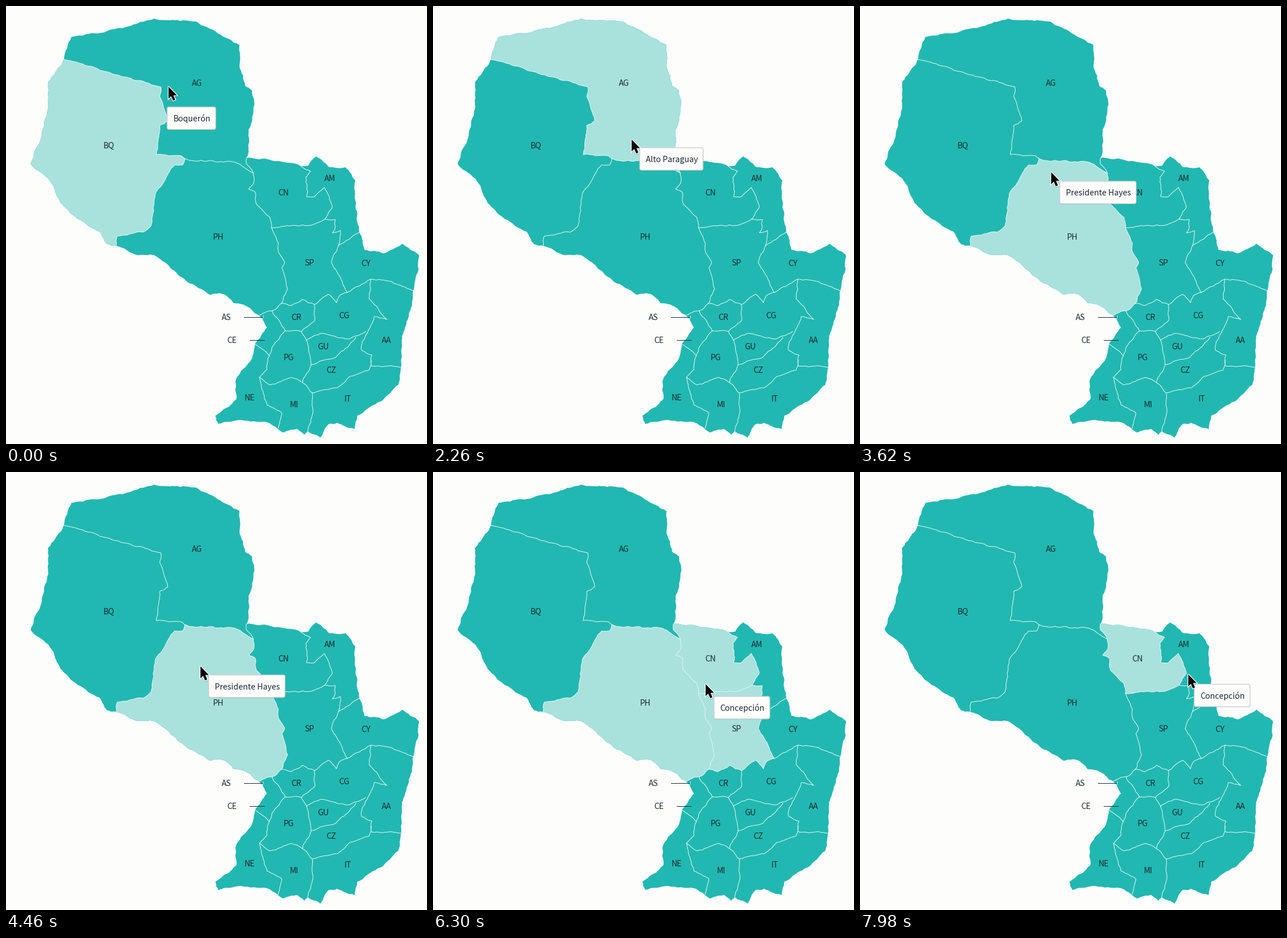
Write a matplotlib script that moves like this. It is 734 by 763 pixels and loops after 8000 ms.

```python
import math
import random

import matplotlib.pyplot as plt
import numpy as np
from matplotlib.animation import FuncAnimation
from matplotlib.patches import FancyBboxPatch, Polygon

W, H, DPI = 734, 763, 64
STEP, FRAMES = 40, 200
LAG = 40
PT = 72 / DPI
TEAL, LIGHT, PAPER, INK = "#21b8b1", "#a9e1dd", "#fdfdfc", "#1c2a31"
FONT = dict(family="Noto Sans CJK JP", size=14 * PT, color=INK, va="baseline")

rng = random.Random(4)
arcs = {}


def meander(a, b):
    """Points after a up to b, split again and again with small sideways shifts."""
    dx, dy = b[0] - a[0], b[1] - a[1]
    size = math.hypot(dx, dy)
    if size < 6:
        return [b]
    k = rng.uniform(-1, 1) * min(0.09, 1.6 / size)
    mid = ((a[0] + b[0]) / 2 - k * dy, (a[1] + b[1]) / 2 + k * dx)
    return meander(a, mid) + meander(mid, b)


def arc(name, *points):
    arcs[name] = [points[0]]
    for a, b in zip(points, points[1:]):
        arcs[name] += meander(a, b)


def ring(names):
    """Join arcs into a closed outline; a leading minus reverses an arc."""
    out = []
    for name in names.split():
        out += arcs[name[1:]][::-1] if name[0] == "-" else arcs[name]
    return out


# outer edge, clockwise
arc("ag", (101, 93), (114, 54), (194, 39), (258, 22), (331, 27), (407, 68), (407, 104),
    (417, 139), (429, 147), (433, 172), (423, 215), (424, 236), (419, 265))
arc("cn", (419, 265), (456, 267), (490, 273), (513, 278))
arc("am", (513, 278), (527, 278), (541, 262), (562, 280), (592, 281), (609, 304),
    (608, 322), (616, 394))
arc("cy", (616, 394), (625, 425), (658, 431), (691, 414), (720, 434), (719, 460),
    (710, 496))
arc("aa", (710, 496), (705, 530), (690, 582), (689, 629))
arc("it", (689, 629), (684, 660), (655, 688), (613, 713), (608, 737), (577, 726),
    (563, 728), (548, 752), (526, 741))
arc("mi", (526, 741), (520, 747), (508, 737), (483, 743), (474, 737))
arc("ne", (474, 737), (455, 725), (410, 721), (370, 728), (365, 714), (402, 684),
    (400, 655), (430, 610), (434, 589))
arc("ce", (434, 589), (455, 560), (441, 539))
arc("ph", (441, 539), (420, 523), (396, 517), (380, 502), (355, 503), (315, 480),
    (258, 434), (230, 434), (192, 418))
arc("bq", (192, 418), (176, 415), (163, 393), (125, 371), (95, 343), (73, 300),
    (43, 275), (66, 210), (74, 160), (73, 133), (101, 93))
coast = list(arcs)

# borders of the regions that light up
arc("ag_bq", (101, 93), (185, 118), (270, 141), (268, 158), (282, 200), (268, 208),
    (262, 259), (306, 261), (312, 266))
arc("bq_ph", (312, 266), (308, 277), (294, 277), (275, 307), (260, 329), (253, 383),
    (239, 394), (194, 401), (192, 418))
arc("ag_ph", (312, 266), (320, 269), (399, 272), (431, 291))
arc("ag_cn", (419, 265), (419, 275), (431, 291))
arc("ph_cn", (431, 291), (432, 308), (423, 319), (435, 325), (437, 346), (460, 368),
    (463, 386))
arc("ph_sp", (463, 386), (475, 413), (474, 424), (486, 447), (481, 456), (491, 493),
    (480, 518))
arc("ph_ce", (480, 518), (464, 531), (455, 532), (441, 539))
arc("cn_am", (513, 278), (531, 288), (523, 298), (524, 332), (538, 332), (555, 316),
    (569, 350), (556, 371))
arc("cn_sp", (463, 386), (535, 381), (556, 371))
arc("sp_am", (556, 371), (574, 372), (574, 386), (569, 395), (583, 391), (580, 417))
arc("sp_cy", (580, 417), (567, 447), (577, 463), (595, 499))
arc("sp_cg", (595, 499), (581, 505), (576, 517), (562, 502), (538, 520))
arc("sp_cr", (538, 520), (517, 511), (497, 522), (480, 518))

# remaining borders, each drawn through several junctions
arc("am_cy", (580, 417), (616, 394))
arc("cy_south", (595, 499), (636, 476), (672, 480), (710, 496))
arc("aa_west", (636, 476), (633, 510), (664, 546), (642, 541), (621, 585), (620, 600),
    (638, 608), (637, 627), (689, 629))
arc("cr_cg", (538, 520), (538, 548), (515, 567))
arc("cr_south", (464, 531), (487, 566), (515, 567), (524, 582))
arc("pg_west", (487, 566), (464, 594), (459, 609), (455, 633), (442, 647))
arc("ne_ce", (434, 589), (459, 609))
arc("pg_east", (524, 582), (532, 625), (517, 656))
arc("gu_cg", (524, 582), (550, 570), (598, 580), (627, 567))
arc("gu_cz", (532, 625), (575, 612), (610, 577))
arc("south", (442, 647), (460, 660), (498, 647), (517, 656), (534, 674), (578, 665),
    (600, 645), (633, 634), (637, 617))
arc("mi_it", (534, 674), (535, 709), (526, 741))
arc("mi_ne", (442, 647), (455, 695), (481, 709), (474, 737))
arc("as", (449, 540), (447, 547))

LABELS = dict(AG=(333, 134), BQ=(179, 243), PH=(370, 402), CN=(483, 325),
              AM=(564, 300), SP=(528, 447), CY=(627, 448), CR=(506, 542),
              CG=(589, 539), AA=(663, 582), GU=(553, 593), PG=(492, 612),
              CZ=(566, 634), NE=(424, 682), MI=(502, 694), IT=(595, 684),
              AS=(384, 542), CE=(393, 582))

# region: name, outline, time the pointer enters and leaves
REGIONS = [
    ("Boquerón", "bq ag_bq bq_ph", -999, 40),
    ("Alto Paraguay", "ag ag_cn -ag_ph -ag_bq", 40, 2920),
    ("Presidente Hayes", "ag_ph ph_cn ph_sp ph_ce ph -bq_ph", 2920, 6200),
    ("San Pedro", "cn_sp sp_am sp_cy sp_cg sp_cr -ph_sp", 6200, 6240),
    ("Concepción", "cn cn_am -cn_sp -ph_cn -ag_cn", 6240, 9999),
]

# time, x, y of the pointer tip
POINTER = [(-40, 266, 158), (0, 283, 140), (240, 320, 146), (1240, 332, 156),
           (2240, 346, 232), (3600, 333, 289), (4920, 342, 366), (5320, 382, 382),
           (6160, 458, 396), (6240, 475, 373), (6280, 475, 369), (7560, 530, 349),
           (7960, 572, 352)]


def pointer(t):
    times, xs, ys = zip(*POINTER)
    return np.interp(t, times, xs), np.interp(t, times, ys)


def glow(enter, leave, t):
    """Full while hovered, then a short hold and fade."""
    if t < enter:
        return 0.0
    return min(1.0, max(0.0, 1 - (t - leave - 120) / 120))


fig = plt.figure(figsize=(W / DPI, H / DPI), dpi=DPI, facecolor=PAPER)
ax = fig.add_axes([0, 0, 1, 1])
ax.set(xlim=(0, W), ylim=(H, 0))
ax.axis("off")

ax.add_patch(Polygon(ring(" ".join(coast)), fc=TEAL, ec="none"))
lit = [ax.add_patch(Polygon(ring(names), fc=LIGHT, ec="none", zorder=2))
       for _, names, _, _ in REGIONS]
for name, points in arcs.items():
    if name not in coast:
        ax.plot(*zip(*points), color="#e6f7f5", lw=PT, zorder=3,
                solid_joinstyle="round")
for x0, x1, y in ((415, 447, 542), (425, 450, 582)):
    ax.plot((x0, x1), (y, y), color=INK, lw=PT, zorder=4)
for code, (x, y) in LABELS.items():
    ax.text(x + 0.5, y + 5, code, ha="center", zorder=4, **FONT)

ROUND = dict(boxstyle="round,pad=0,rounding_size=3")
shade = ax.add_patch(FancyBboxPatch((0, 0), 1, 1, fc="#00000014", ec="none", zorder=5,
                                    **ROUND))
box = ax.add_patch(FancyBboxPatch((0, 0), 1, 1, fc=PAPER, ec="#d3d2cb", lw=1.4 * PT,
                                  zorder=6, **ROUND))
tip = ax.text(0, 0, "", ha="left", zorder=7, **FONT)

ARROW = np.array([(0, 0), (0, 21), (4.6, 16.6), (8, 24.5), (11.8, 22.9), (8.5, 15.2),
                  (14.6, 15)])
arrow = [ax.add_patch(Polygon(ARROW, fc=fill, ec=edge, lw=wide * PT, zorder=8))
         for fill, edge, wide in (("#00000020", "#00000020", 2.4),
                                  ("white", "white", 2.6), ("#050505", "none", 0))]

renderer = fig.canvas.get_renderer()
widths = {}
for name, *_ in REGIONS:
    tip.set_text(name)
    widths[name] = tip.get_window_extent(renderer).width


def draw(i):
    t = i * STEP
    label = ""
    for patch, (name, _, enter, leave) in zip(lit, REGIONS):
        patch.set_alpha(glow(enter, leave, t))
        if enter <= t < leave:
            label = name

    # the tooltip trails the pointer
    x, y = pointer(t - LAG)
    x, y = x + 15, y + 18
    wide = widths[label] + 19.5
    box.set_bounds(x, y, wide, 39)
    shade.set_bounds(x - 0.5, y + 1, wide + 1.5, 39.5)
    tip.set_text(label)
    tip.set_position((x + 10.5, y + 25))

    for shape, drop in zip(arrow, (1.5, 0, 0)):
        shape.set_xy(ARROW + pointer(t) + np.array([0.3, drop + 0.5]))
    return [*lit, shade, box, tip, *arrow]


anim = FuncAnimation(fig, draw, frames=FRAMES, interval=STEP, repeat=True,
                     repeat_delay=0, blit=False)
plt.show()
```
